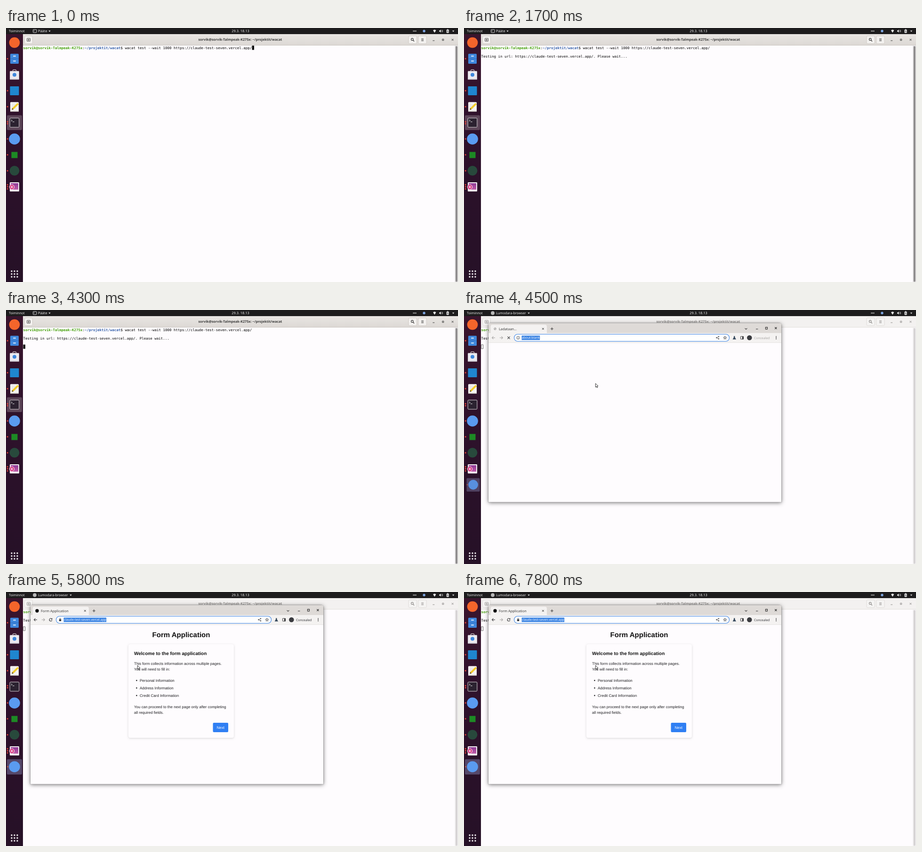
Recreate the animation shown at these times as an HTML page with a canvas. Size 960 px wide and 540 px high, loop 8000 ms.

```html
<!DOCTYPE html>
<html lang="fi">
<head>
<meta charset="utf-8">
<title>Terminal test run</title>
<style>
  html, body { margin: 0; width: 100%; height: 100%; overflow: hidden; background: #fefcfe; }
  canvas { display: block; }
</style>
</head>
<body>
<canvas id="stage" width="960" height="540"></canvas>
<script>
const ctx = document.getElementById('stage').getContext('2d');
const LOOP = 8000;
const ENTER = 700, OUTPUT = 1200, OPEN = 4350, DOCKED = 4370, LOADED = 4800, ICON = 5600;
const BLINK = 600;

const UI = '"Noto Sans", sans-serif';
const MONO = '"DejaVu Sans Mono", monospace';
const PAGE = '"Liberation Sans", Arial, sans-serif';
const PAPER = '#fefcfe';
const CELL = 4.5, LINE = 9, LEFT = 36.5, TOP = 37.5;
const USER = 'sorvik@sorvik-Talmpeak-K275x';
const DIR = '~/projektit/wacat';
const URL_TEXT = 'claude-test-seven.vercel.app';

const clamp = v => Math.max(0, Math.min(1, v));
const outQuad = p => 1 - (1 - p) ** 2;
const outExpo = p => p >= 1 ? 1 : 1 - 2 ** (-10 * p);

function text(str, x, y, size, color, { font = UI, weight = 400, align = 'left' } = {}) {
  ctx.font = `${weight} ${size}px ${font}`;
  ctx.textAlign = align;
  ctx.fillStyle = color;
  ctx.fillText(str, x, y);
}

function rect(x, y, w, h, color) {
  ctx.fillStyle = color;
  ctx.fillRect(x, y, w, h);
}

function box(x, y, w, h, r, fill, stroke, width = 1) {
  ctx.beginPath();
  ctx.roundRect(x, y, w, h, r);
  if (fill) { ctx.fillStyle = fill; ctx.fill(); }
  if (stroke) { ctx.strokeStyle = stroke; ctx.lineWidth = width; ctx.stroke(); }
}

function disc(x, y, r, fill, stroke, width = 1) {
  ctx.beginPath();
  ctx.arc(x, y, r, 0, Math.PI * 2);
  if (fill) { ctx.fillStyle = fill; ctx.fill(); }
  if (stroke) { ctx.strokeStyle = stroke; ctx.lineWidth = width; ctx.stroke(); }
}

// Open polyline or filled polygon from a flat list of coordinates.
function poly(pts, { stroke, fill, width = 1 }) {
  ctx.beginPath();
  for (let i = 0; i < pts.length; i += 2) ctx.lineTo(pts[i], pts[i + 1]);
  if (fill) { ctx.closePath(); ctx.fillStyle = fill; ctx.fill(); }
  if (stroke) { ctx.strokeStyle = stroke; ctx.lineWidth = width; ctx.stroke(); }
}

function cross(x, y, r, color, width = 1) {
  poly([x - r, y - r, x + r, y + r], { stroke: color, width });
  poly([x - r, y + r, x + r, y - r], { stroke: color, width });
}

function plus(x, y, r, color, width = 1) {
  rect(x - r, y - width / 2, 2 * r, width, color);
  rect(x - width / 2, y - r, width, 2 * r, color);
}

function vGrad(y0, y1, ...colors) {
  const g = ctx.createLinearGradient(0, y0, 0, y1);
  colors.forEach((c, i) => g.addColorStop(i / (colors.length - 1), c));
  return g;
}

function caret(x, y, color) {
  poly([x - 2.2, y - 1.1, x + 2.2, y - 1.1, x, y + 1.5], { fill: color });
}

function topBar(browser) {
  const ink = '#ececec';
  rect(0, 0, 960, 13, '#1d1c1d');
  text('Toiminnot', 6, 9.3, 7.1, ink);
  if (browser) {
    disc(61, 6.5, 3.9, '#b9b9b9');
    text('Lumodara-browser', 68, 9.3, 7.1, ink);
    caret(137.5, 6.7, ink);
  } else {
    box(57.5, 3.2, 7.4, 6.6, 1, null, ink, 0.9);
    poly([59, 5, 60.5, 6.2, 59, 7.4], { stroke: ink, width: 0.7 });
    text('Pääte', 68, 9.3, 7.4, ink);
    caret(92.5, 6.7, ink);
  }
  text('29.3. 18.13', 498, 9.3, 7.4, ink, { weight: 500, align: 'center' });
  for (const x of [865.4, 868, 870.6]) disc(x, 6.5, 1, ink);
  disc(888, 6.5, 2.7, '#7da4df');
  poly([907, 5, 908.6, 4, 910.2, 3.6, 911.8, 4, 913.4, 5, 910.2, 10], { fill: ink });
  poly([920, 5.2, 921.6, 5.2, 923.6, 3.2, 923.6, 9.8, 921.6, 7.8, 920, 7.8], { fill: ink });
  for (const r of [1.7, 3.5]) {
    ctx.beginPath();
    ctx.arc(924, 6.5, r, -0.9, 0.9);
    ctx.strokeStyle = ink; ctx.lineWidth = 0.8; ctx.stroke();
  }
  box(935.6, 3.4, 5, 7, 0.8, ink);
  rect(937, 2.4, 2.2, 1, ink);
  poly([938.6, 4.6, 937, 7.2, 939.2, 7, 938, 9.4], { stroke: '#1d1c1d', width: 0.7 });
  caret(950, 6.7, ink);
}

function dock(t, browser) {
  rect(0, 13, 36, 527, vGrad(13, 540, '#3a152d', '#30122c', '#2a1129', '#261127'));

  if (!browser) box(2, 185.5, 32, 31.5, 2, '#5d4659');
  disc(18, 31, 11.3, '#f4652b');

  // file cabinet
  box(9, 54.8, 18, 21.2, 1.6, '#3f87dc');
  rect(9, 65, 18, 0.8, '#2a65b4');
  box(15, 58.8, 6, 2, 0.8, '#dcebfb');
  box(15, 69.2, 6, 2, 0.8, '#dcebfb');

  // shopping bag
  box(14.3, 88.6, 7.4, 6, 2.4, null, '#c9c3c6', 1.1);
  box(8.2, 91.6, 19.6, 18, 1.4, '#eceaf0');
  rect(8.2, 107.8, 19.6, 1.8, '#cfccd4');
  disc(18, 99.6, 4, '#3f87dc');

  box(8.5, 124, 19, 19, 1, '#1f86cf');

  // notepad and pencil
  box(9, 157.4, 18, 20.6, 1.5, '#f7f5f4');
  rect(9, 176, 18, 2, '#cfcac6');
  for (const y of [161.5, 164.5, 167.5, 170.5]) rect(11.5, y, 9, 0.6, '#c8c4c4');
  poly([12.3, 174, 13.2, 170.3, 24.3, 159.2, 27.2, 162, 16, 173], { fill: '#f3cb2b' });
  poly([12.3, 174, 13.2, 170.3, 16, 173], { fill: '#5a4b32' });

  // terminal
  box(8.2, 191.4, 19.6, 19.6, 1.6, '#2b2230', '#d7d2d6', 1);
  poly([11, 195, 13.2, 196.8, 11, 198.6], { stroke: '#fff', width: 0.9 });
  rect(14, 199, 3.6, 0.9, '#fff');

  disc(18, 236, 11.8, '#5a9bf0');
  box(11.5, 263.5, 13, 13, 0, '#1d8a24');
  disc(18, 303.3, 10.4, '#28493c');

  // screen capture tool
  box(8, 328, 20, 19.6, 1.4, '#f5f1f4');
  rect(10, 330, 16, 13.6, vGrad(330, 344, '#8e3a96', '#c05aa9'));
  disc(12.4, 338, 5.2, '#d83f86', '#f6e9f1', 1);
  disc(12.4, 338, 2.1, '#f3d3e3');

  const marks = [65.3, 133.3, 167.3, 199.2, 203.6, 235.8, 269.6, 303.4, 333.3, 337.6, 342];
  for (const y of marks) disc(3.2, y, 1.5, '#e2453a');

  const grow = outQuad(clamp((t - DOCKED) / 200));
  if (grow > 0) {
    ctx.save();
    ctx.globalAlpha = grow;
    ctx.translate(18 + (1 - grow) * 13, 371.5);
    ctx.scale(grow, grow);
    box(-16, -16, 32, 32.5, 2, '#55486a');
    disc(0, 0, 11.8, '#5a9bf0');
    disc(-14.5, 0, 1.3, '#e2653a');
    ctx.restore();
  }

  for (let i = 0; i < 9; i++) disc(12 + (i % 3) * 6, 517 + Math.floor(i / 3) * 6, 1.7, '#f3f0f2');
}

function terminal(t, focused) {
  const ink = focused ? '#3a3a3a' : '#8f8c8a';
  rect(36, 13, 924, 527, PAPER);
  rect(36, 13, 924, 24, focused ? vGrad(13, 37, '#e9e6e3', '#dcd8d4') : '#f3f1f0');
  rect(36, 36.5, 924, 0.7, focused ? '#c2bcb7' : '#d8d4d0');
  for (const [x, w] of [[39.5, 17], [855, 17.4], [875.8, 17.4]])
    box(x, 16.8, w, 16.4, 2.5, focused ? '#f3f1ef' : '#f5f4f3', focused ? '#cbc5bf' : '#dad6d2', 0.8);

  box(44.6, 22, 6.8, 6.2, 0.5, null, ink, 0.9);
  plus(48, 25.2, 1.9, ink, 1);
  disc(862.8, 24.2, 2.3, null, ink, 1.1);
  poly([864.5, 26, 867, 28.5], { stroke: ink, width: 1.3 });
  for (const y of [22.4, 24.6, 26.8]) rect(882, y, 5, 0.9, ink);
  rect(906.2, 26.4, 4, 1, ink);
  box(926.7, 23.6, 3, 3, 0, null, ink, 1);
  cross(948.5, 25, 1.9, ink, 1);
  text(USER + ': ' + DIR, 497.5, 27.4, 7.19, ink, { weight: 700, align: 'center' });

  rect(953, 37.5, 7, 502.5, focused ? '#e4e1e2' : '#f2f0f1');
  box(954.9, 38.5, 3.8, 501, 1.9, focused ? '#8b898a' : '#d5d2d3');

  const put = (str, col, row, color, weight) =>
    text(str, LEFT + col * CELL, TOP + 7.5 + row * LINE, 7.475, color, { font: MONO, weight });
  const path = USER.length + 1, tail = path + DIR.length;
  const command = '$ wacat test --wait 1000 https://' + URL_TEXT + '/';
  put(USER, 0, 0, '#43a008', 700);
  put(':', USER.length, 0, '#000');
  put(DIR, path, 0, '#3460ab', 700);
  put(command, tail, 0, '#000');
  if (t >= OUTPUT) put('Testing in url: https://' + URL_TEXT + '/. Please wait...', 0, 2, '#000');

  const row = t < ENTER ? 0 : t < OUTPUT ? 1 : 4;
  const x = LEFT + (row ? 0 : (tail + command.length) * CELL);
  const y = TOP + row * LINE;
  const lit = t < ENTER || Math.floor((t - ENTER) / BLINK) % 2 === 0;
  if (!focused) box(x + 0.3, y + 0.3, CELL - 0.6, LINE - 0.6, 0, null, '#333', 0.7);
  else if (lit) rect(x, y, CELL, LINE, '#0c0c0c');
}

function page() {
  const ink = '#1c1c1f', body = { font: PAGE };
  text('Form Application', 372, 96.2, 15, '#111', { font: PAGE, weight: 700, align: 'center' });
  ctx.save();
  ctx.shadowColor = 'rgba(0,0,0,.14)';
  ctx.shadowBlur = 4;
  ctx.shadowOffsetY = 1.2;
  box(260, 111, 224, 199, 4, PAPER);
  ctx.restore();
  text('Welcome to the form application', 272, 134.4, 10, '#111', { font: PAGE, weight: 700 });
  text('This form collects information across multiple pages.', 272, 154.5, 8, ink, body);
  text('You will need to fill in:', 272, 166.5, 8, ink, body);
  ['Personal', 'Address', 'Credit Card'].forEach((kind, i) => {
    const y = 190.5 + i * 16;
    disc(277.4, y - 2.4, 1.3, ink);
    text(kind + ' Information', 284, y, 8, ink, body);
  });
  text('You can proceed to the next page only after completing', 272, 246.5, 8, ink, body);
  text('all required fields.', 272, 258.5, 8, ink, body);
  box(439.5, 278, 32.5, 20, 2, '#2f7ff3');
  text('Next', 455.7, 290.6, 8, '#fff', { font: PAGE, align: 'center' });
}

function arrow(x, y, dir, color) {
  poly([x - 3.2, y, x + 3.2, y], { stroke: color, width: 1.1 });
  poly([x + dir * 0.4, y - 2.9, x + dir * 3.3, y, x + dir * 0.4, y + 2.9], { stroke: color, width: 1.1 });
}

function favicon(t) {
  if (t >= ICON) return disc(66, 40, 3.7, '#0a0a0a');
  if (t < LOADED) {
    disc(66, 40, 2.2, null, '#8a8a8a', 0.9);
    return poly([64.5, 41.5, 67.5, 38.5], { stroke: '#777', width: 0.8 });
  }
  disc(66, 40, 3.6, '#4d5156');
  poly([63.4, 39, 65.4, 39.4, 66.2, 41, 65.4, 43, 64, 41.6], { fill: '#e6e4e3' });
  poly([66.4, 37.2, 68.6, 38.6, 67.4, 40], { fill: '#e6e4e3' });
}

function toolbar(t) {
  const ink = '#3c3c3f', dim = '#a9a7a6', done = t >= LOADED;
  arrow(62.8, 59, -1, done ? ink : dim);
  arrow(79, 59, 1, dim);
  if (done) {
    ctx.beginPath();
    ctx.arc(95, 59, 2.9, 0.3, 5.4);
    ctx.strokeStyle = ink; ctx.lineWidth = 1.1; ctx.stroke();
    poly([98.4, 55.2, 98.4, 58.4, 95.2, 58.4], { fill: ink });
  } else cross(95, 59, 2.6, ink, 1.1);

  box(106.5, 51.5, 457, 15, 7.5, '#fff', '#3f86e6', 1.1);
  if (done) {
    box(112.8, 58, 4.4, 4, 0.5, ink);
    box(113.8, 55.6, 2.4, 4, 1.2, null, ink, 0.8);
  } else {
    disc(115, 59, 3.2, null, '#55565a', 0.9);
    rect(114.6, 58.4, 0.9, 2.6, '#55565a');
    rect(114.6, 56.8, 0.9, 0.9, '#55565a');
  }
  const address = done ? URL_TEXT : 'about:blank';
  ctx.font = `400 6.75px ${UI}`;
  rect(122.5, 54.4, ctx.measureText(address).width + 0.8, 9.4, '#3b84e3');
  text(address, 122.9, 61.3, 6.75, '#f4f8ff');

  // share, star, flask, side panel, profile, menu
  poly([541, 56.6, 536.2, 59, 541, 61.4], { stroke: ink, width: 0.8 });
  for (const [x, y] of [[541, 56.6], [536.2, 59], [541, 61.4]]) disc(x, y, 1.1, ink);
  const star = [];
  for (let i = 0; i <= 10; i++) {
    const r = i % 2 ? 1.5 : 3.5, a = i * Math.PI / 5 - Math.PI / 2;
    star.push(554.3 + r * Math.cos(a), 59.2 + r * Math.sin(a));
  }
  poly(star, { stroke: ink, width: 0.9 });
  poly([573, 55.6, 575.4, 55.6, 575.4, 58, 578, 62.4, 570.6, 62.4, 573, 58], { fill: '#35485c' });
  box(587.4, 56.2, 6.2, 5.8, 0.5, null, ink, 1);
  rect(590.8, 56, 3, 6.2, ink);
  disc(606.3, 59, 5.3, '#3a3b3f');
  text('Concealed', 616, 61.5, 6.8, done ? '#303134' : '#a5a3a2');
  for (const y of [56.4, 59, 61.6]) disc(663, y, 0.9, ink);
}

function browserWindow(t) {
  const s = outExpo(clamp((t - OPEN) / 150)), ink = '#333';
  const round = [4, 4, 0, 0];
  ctx.save();
  ctx.globalAlpha = s;
  ctx.translate(363, 218);
  ctx.scale(s, s);
  ctx.translate(-363, -218);

  ctx.save();
  ctx.shadowColor = 'rgba(0,0,0,.55)';
  ctx.shadowBlur = 8;
  ctx.shadowOffsetY = 1.5;
  box(52, 28, 622, 380.3, round, PAPER);
  ctx.restore();
  box(51.75, 27.75, 622.5, 380.8, round, null, 'rgba(0,0,0,.4)', 0.5);
  box(52, 28, 622, 380.3, round, PAPER);
  box(52, 28, 622, 21, round, '#dedad7');
  rect(52, 49, 622, 20.5, '#f4f2f1');
  rect(52, 69.5, 622, 0.5, '#d3d0ce');
  box(56.5, 31.3, 119.5, 18, round, '#f4f2f1');

  favicon(t);
  text(t >= LOADED ? 'Form Application' : 'Ladataan…', 74, 42.6, 7.35, '#3a3a3a');
  cross(167.8, 40, 1.9, ink, 1);
  plus(186.8, 40, 3, ink, 1);
  poly([596.6, 38.8, 599, 41.1, 601.4, 38.8], { stroke: ink, width: 1.1 });
  rect(620, 40, 4.4, 1, ink);
  box(640.4, 36.6, 4, 4, 0, null, ink, 1.1);
  cross(662.3, 38.6, 2.1, ink, 1.1);
  toolbar(t);
  if (t >= LOADED) page();
  ctx.restore();
}

function pointer(x, y) {
  poly([x, y, x, y + 8.2, x + 1.9, y + 6.4, x + 3.1, y + 9.2, x + 4.5, y + 8.6,
    x + 3.3, y + 5.9, x + 5.6, y + 5.7, x, y], { fill: '#fff', stroke: '#222', width: 0.9 });
}

function draw() {
  const t = performance.now() % LOOP;
  const browser = t >= OPEN;
  ctx.textRendering = 'geometricPrecision';
  terminal(t, !browser);
  if (browser) browserWindow(t);
  dock(t, browser);
  topBar(browser);
  if (browser) pointer(279.3, 156);
  requestAnimationFrame(draw);
}

draw();
</script>
</body>
</html>
```
